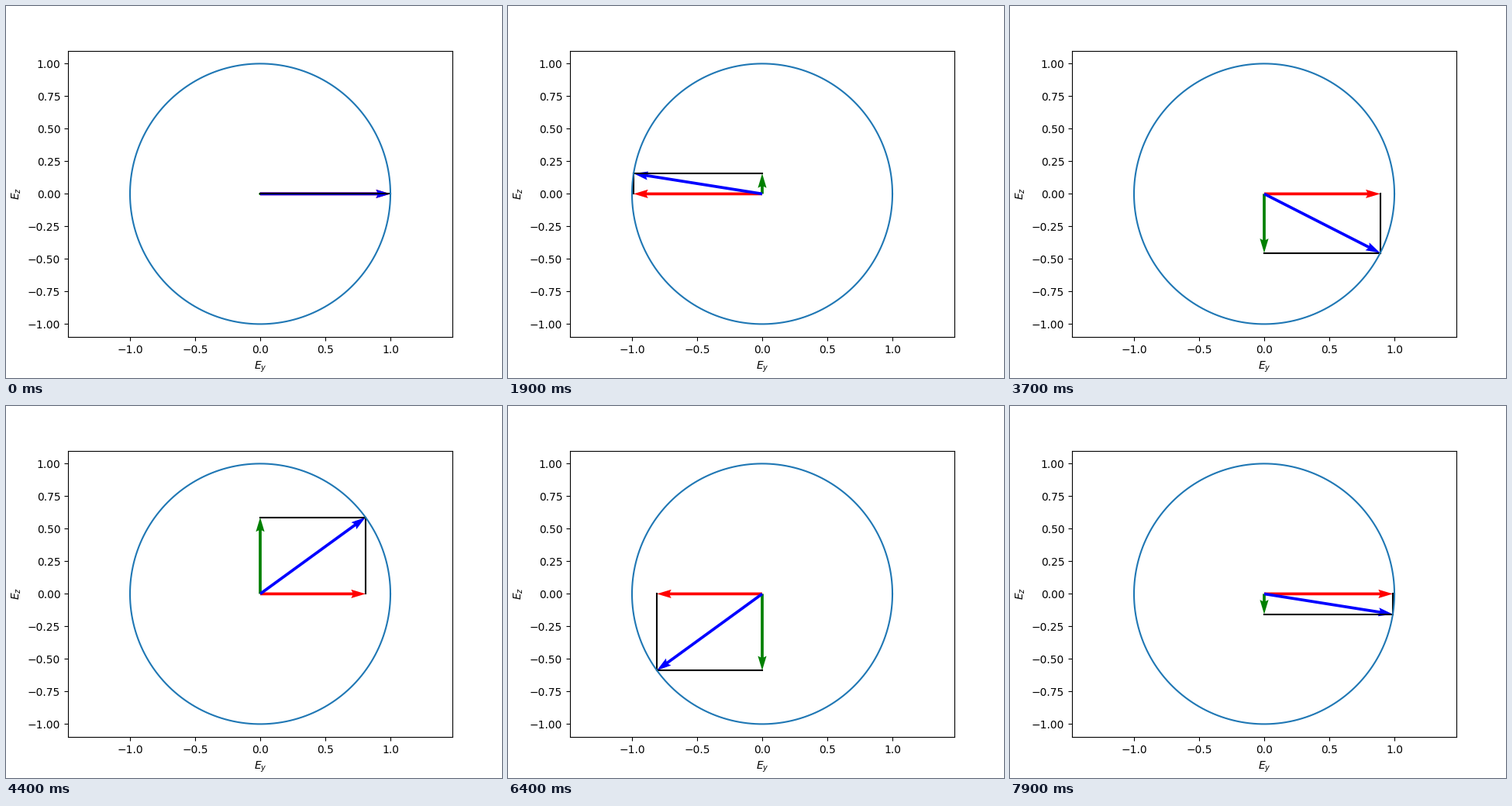
A matplotlib script for the animation above (8000 ms loop, 640 by 480 pixels).

```python
import numpy as np
import matplotlib.pyplot as plt
from matplotlib.animation import FuncAnimation

FRAMES = 80
PER_TURN = 40

fig, ax = plt.subplots(figsize=(6.4, 4.8), dpi=100)
ax.set_xlim(-496 / 336, 496 / 336)
ax.set_ylim(-1.1, 1.1)
ax.set_xlabel("$E_y$")
ax.set_ylabel("$E_z$")


def arrow(color):
    return ax.quiver(0, 0, 1, 0, color=color, angles="xy",
                     scale_units="xy", scale=1)


y_arrow, z_arrow, total = (arrow(c) for c in ("red", "green", "blue"))
top, = ax.plot([], [], "k-")
side, = ax.plot([], [], "k-")

turn = np.linspace(0, 2 * np.pi, 400)
ax.plot(np.cos(turn), np.sin(turn), color="C0")


def update(i):
    angle = 2 * np.pi * i / PER_TURN
    y, z = np.cos(angle), np.sin(angle)
    y_arrow.set_UVC(y, 0)
    z_arrow.set_UVC(0, z)
    total.set_UVC(y, z)
    top.set_data([0, y], [z, z])
    side.set_data([y, y], [0, z])
    return y_arrow, z_arrow, total, top, side


anim = FuncAnimation(fig, update, frames=FRAMES, interval=100,
                     repeat=True, repeat_delay=0, blit=False)
plt.show()
```
